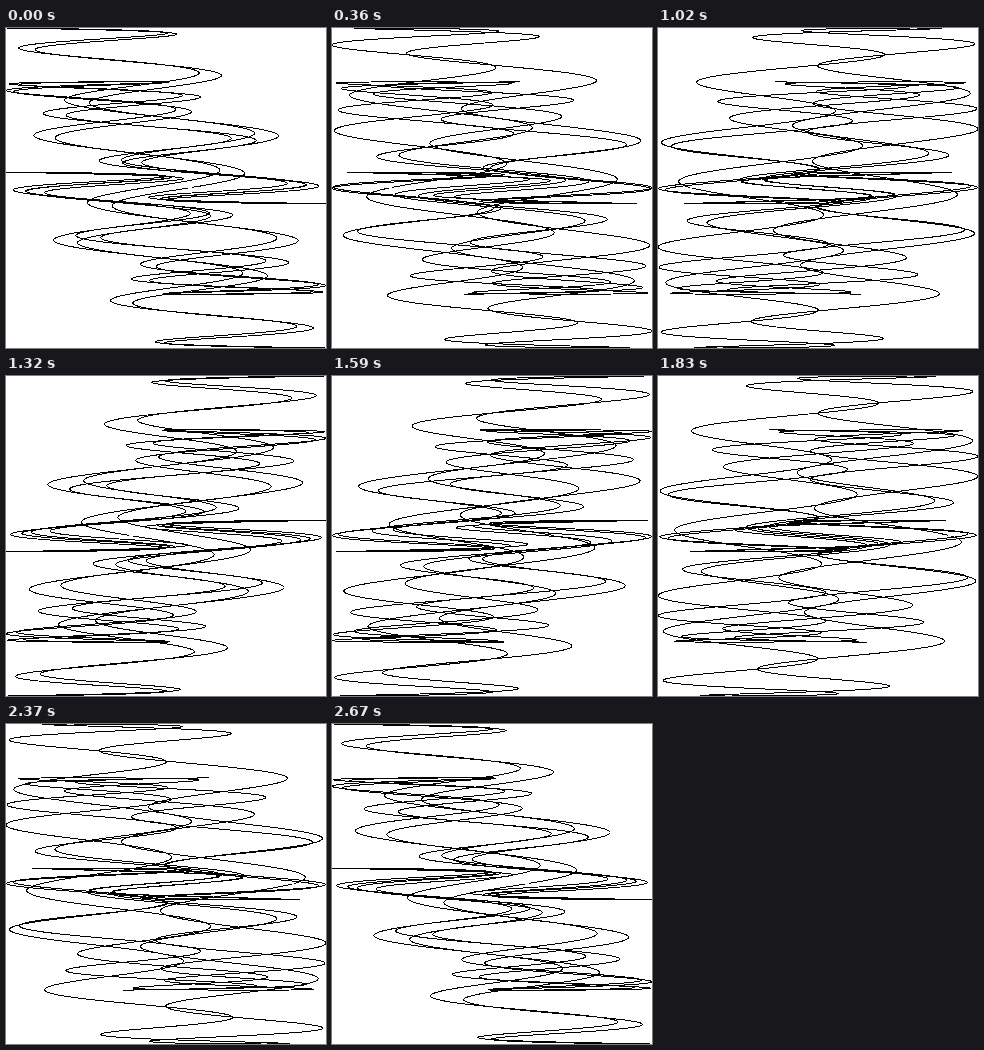
Recreate the animation shown at these times as an HTML page. Size 320x320 px, loop 2.7 s.

```html
<!DOCTYPE html>
<html>
<head>
<meta charset="utf-8">
<style>
  html, body { margin: 0; width: 100%; height: 100%; overflow: hidden; background: #fff; }
  svg { display: block; width: 320px; height: 320px; }
  path { fill: none; stroke: #000; stroke-width: 1; shape-rendering: crispEdges; }
</style>
</head>
<body>
<svg viewBox="0 0 320 320"><path id="curve"/></svg>
<script>
const STEPS = 90, STEP_MS = 30, POINTS = 5000;
const { sin, PI } = Math;
const curve = document.getElementById('curve');
const start = performance.now();
let shown = -1;

function draw(step) {
  const phase = 2 * PI * (2 - step) / STEPS;
  const points = [];
  // Left open: a tiny gap remains between the last and the first point.
  for (let i = 0; i < POINTS; i++) {
    const a = 2 * PI * i / POINTS;
    const x = 160 + 80 * (sin(phase + 5 * a) + sin(phase - 43 * a));
    const y = 160 + 80 * (sin(a) + sin(5 * a));
    points.push(x.toFixed(2) + ' ' + y.toFixed(2));
  }
  curve.setAttribute('d', 'M' + points.join('L'));
}

function tick() {
  const step = Math.floor((performance.now() - start) / STEP_MS) % STEPS;
  if (step !== shown) draw(shown = step);
  requestAnimationFrame(tick);
}
tick();
</script>
</body>
</html>
```
